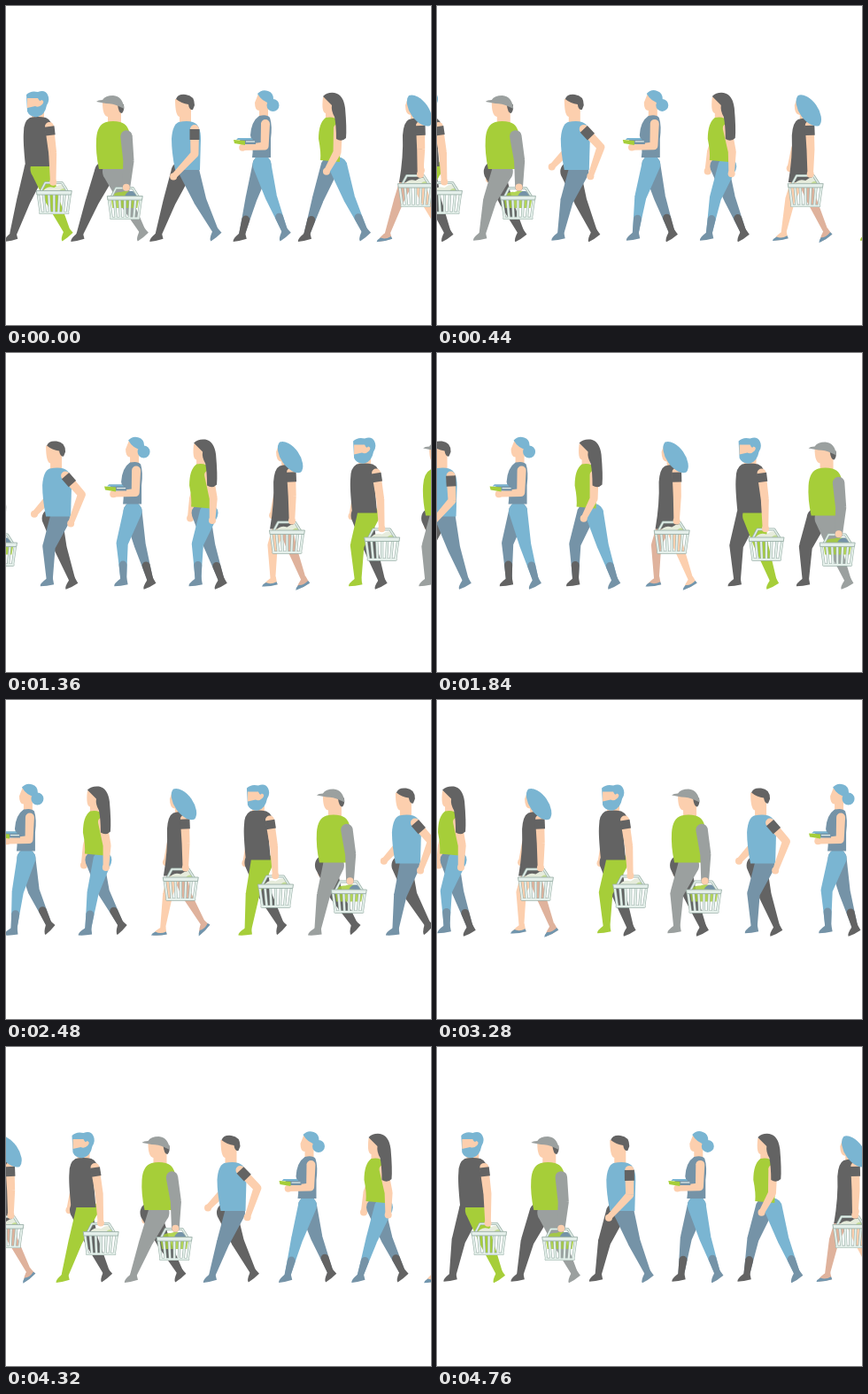
Write an HTML page that moves like this. It is 480 by 360 pixels and loops after 4800 ms.

```html
<!DOCTYPE html>
<html lang="en">
<head>
<meta charset="utf-8">
<title>Shopping queue</title>
<style>
html, body { margin: 0; width: 100%; height: 100%; overflow: hidden; background: #fff; }
svg { display: block; width: 480px; height: 360px; }
</style>
</head>
<body>
<svg id="stage" viewBox="0 0 480 360"></svg>
<script>
const LOOP = 4800, CYCLE = 960, SPAN = 515, STEP = 40, GROUND = 258.5;
const SKIN = '#fccfae', SHADE = '#dfb29c', DARK = '#636363', GREEN = '#a6ce39',
      BLUE = '#7ab5d2', SLATE = '#7593a7', GREY = '#9ba09f', SHOE = '#7196ae';
const stage = document.getElementById('stage');

// Ankle, foot and knee over one cycle, starting at heel contact
const STRIDE = [-25, -15.5, -6, 3.5, 13, 22, 28.5, 28, 23, 13, 0, -11.5];
const LIFT = [1, 0, 0, 0, 1, 2.5, 5, 6, 10, 11, 8, 3];
const PITCH = [8, 0, 0, 0, 8, 24, 35, 42, 45, 35, 20, 4];
const BEND = [1, 3, 3, 3, 2, 1.5, 2, 4, 9, 13, 12, 7];

// x is the place at time zero; near/far give hip offset and colours
const people = [
  { x: 36, hipY: 184, hipW: 25, stride: 1,
    near: [4, GREEN, GREEN], far: [-3, DARK, DARK],
    face: 'M-7 116H7V129H-7Z',
    body: [DARK, 'M-9 126Q0 124 9 126Q17 129 18 144L11 147L14 181H-14Q-17 152 -16 142Q-16 130 -9 126Z'],
    hair: [[BLUE, 'M-13 100Q-8 95 0 97Q8 94 11 100Q14 106 10 112Q8 123 0 125Q-9 126 -12 119Z'],
           [SKIN, 'M-12 104H0Q2 109 4 106Q8 107 5 111Q1 115 -3 113L-12 115Z']],
    arm: { at: [13, 136], up: [8, 1], lo: [2, 1], len: [30, 33], cuff: [0, 10], col: DARK },
    back: { lo: -4, col: SKIN }, basket: [19, 198, .7, 0] },
  { x: 121, hipY: 187, hipW: 24, stride: 1.15,
    near: [0, GREY, GREY], far: [-9, DARK, DARK],
    face: 'M-12 109H9V132H-6V125Q-12 124 -12 109Z',
    body: [GREEN, 'M-8 131Q0 129 8 131Q19 134 19 150L17 184H-16Q-20 165 -19 150Q-18 134 -8 131Z'],
    hair: [[DARK, 'M5 111H12Q13 118 10 121Q6 121 5 111Z'],
           [GREY, 'M-19 108Q-17 106 -12 106Q-9 101 0 101Q11 102 12.5 116L6 113Q0 110 -8 110Z']],
    arm: { at: [15, 147], up: [7, 2], lo: [-3, 2], len: [28, 30], col: GREY, full: 1, w: 1.35 },
    back: { lo: -2, col: DARK }, basket: [15.5, 204, 2.2, 1] },
  { x: 203, hipY: 187, hipW: 23, stride: 1.03,
    near: [4, SLATE, SLATE], far: [-5, DARK, DARK],
    face: 'M-12 105H6V132H-7V125Q-12 124 -12 105Z',
    body: [BLUE, 'M-8 131Q2 129 8 131Q17 134 17 150L16 185H-12Q-16 165 -16 150Q-15 134 -8 131Z'],
    hair: [[DARK, 'M-11 105Q-9 99 0 100Q10 101 10 112L8 117Q4 118 3 111Q-5 110 -11 105Z']],
    arm: { at: [10, 139], up: [22, 22], lo: [-31, 12], len: [28, 35], cuff: [0, 12], col: DARK },
    back: { lo: -34, col: SKIN } },
  { x: 293, hipY: 179, hipW: 21, stride: .9,
    near: [-4, BLUE, SLATE, 1], far: [-4, SLATE, DARK, 1],
    face: 'M-8 99H3V126H-7V118Q-12 118 -12 109Z',
    body: [SLATE, 'M-7 124Q2 122 5 126Q8 135 6 150V171H-15Q-13 158 -17 146Q-16 130 -7 124Z'],
    hair: [[BLUE, 'M-9 99Q-4 93.500 3 96Q9 98 9 105L6 110Q-4 108 -9 99Z'],
           [BLUE, 'M1.500 112a7 7 0 0 1 14 0a7 7 0 0 1 -14 0Z']],
    arm: { at: [0, 133], up: [-2, 0], lo: [-86, 0], len: [25, 25], col: SKIN },
    box: 1 },
  { x: 367, hipY: 181, hipW: 21, stride: 1.05,
    near: [8, BLUE, SLATE, 1], far: [-1, SLATE, DARK, 1],
    face: 'M-8 103H4V128H-6V121Q-11 120 -9 103Z',
    body: [GREEN, 'M-6 126Q4 124 9 130Q11 145 10 176L-12 174Q-11 165 -14 150Q-14 132 -6 126Z'],
    hair: [[DARK, 'M-9 102Q-4 97 4 98Q14 100 16 115Q18 138 17 149Q12 154 6 150Q6 135 4 125Q0 118 1 112Q-3 108 -9 102Z']],
    arm: { at: [8, 138], up: [5, 7], lo: [-15, 14], len: [27, 25], col: SKIN },
    back: { lo: 0, col: SKIN } },
  { x: 462, hipY: 184, hipW: 18, stride: 1.1, flats: 1,
    near: [-2, SKIN, SHOE], far: [-4, SHADE, SHOE],
    face: 'M-8 104H4V129H-5V123Q-11 123 -11 112Z',
    body: [DARK, 'M-7 128Q2 125 8 128Q11 135 10 147L7 165L9 199H-18Q-13 170 -14 146Q-13 131 -7 128Z'],
    hair: [[BLUE, 'M-7 101A12 21 -35 0 1 17 135A12 21 -35 0 1 -7 101Z']],
    arm: { at: [6, 135], up: [2, .5], lo: [-1, .5], len: [27, 28], cuff: [0, 11], col: DARK },
    back: { lo: -5, col: SKIN }, basket: [1, 190, .4, 0] }
];

function el(parent, tag, attrs) {
  const node = document.createElementNS('http://www.w3.org/2000/svg', tag);
  for (const k in attrs) node.setAttribute(k, attrs[k]);
  parent.appendChild(node);
  return node;
}
const set = (node, key, value) => node.setAttribute(key, value);
const mix = (a, b, k) => [a[0] + (b[0] - a[0]) * k, a[1] + (b[1] - a[1]) * k];
const polar = (p, deg, len) => [p[0] + Math.sin(deg * Math.PI / 180) * len,
                                p[1] + Math.cos(deg * Math.PI / 180) * len];

// Smooth periodic curve through evenly spaced keys
function curve(keys, phase) {
  const n = keys.length, f = phase * n, i = Math.floor(f), k = f - i;
  const at = j => keys[((i + j) % n + n) % n];
  const a = at(-1), b = at(0), c = at(1), d = at(2);
  return b + .5 * k * (c - a + k * (2 * a - 5 * b + 4 * c - d + k * (3 * (b - c) + d - a)));
}

// Tapered outline with round joints
function limb(pts, widths) {
  let d = '';
  const f = v => v.toFixed(2);
  pts.forEach((p, i) => {
    const r = widths[i] / 2, [x, y] = p;
    d += `M${f(x - r)} ${f(y)}a${r} ${r} 0 0 0 ${2 * r} 0a${r} ${r} 0 0 0 ${-2 * r} 0Z`;
    if (!i) return;
    const q = pts[i - 1], s = widths[i - 1] / 2, len = Math.hypot(x - q[0], y - q[1]) || 1;
    const nx = (q[1] - y) / len, ny = (x - q[0]) / len;
    d += `M${f(q[0] + nx * s)} ${f(q[1] + ny * s)}L${f(x + nx * r)} ${f(y + ny * r)}` +
         `L${f(x - nx * r)} ${f(y - ny * r)}L${f(q[0] - nx * s)} ${f(q[1] - ny * s)}Z`;
  });
  return d;
}

function makeBasket(parent, leafy) {
  const g = el(parent, 'g', {}), pale = '#e4efea', line = '#9cb2aa';
  if (leafy) {
    el(g, 'path', { d: 'M-16 12Q-12 5 -4 6Q4 3 10 7L16 13L14 24H-14Z', fill: GREEN, opacity: .85 });
    el(g, 'path', { d: 'M0 10Q3 4 9 5L15 11Z', fill: SLATE });
  } else {
    el(g, 'path', { d: 'M-14 13Q-9 4 0 7Q8 1 14 6L16 13Z', fill: '#e6ecdc' });
    el(g, 'path', { d: 'M5 12Q9 5 16 10V13Z', fill: '#c4dc96' });
  }
  for (const [col, w] of [[line, 3], [pale, 1.5]])
    el(g, 'path', { d: 'M-15 11L-10 1.5H9L15 11', fill: 'none', stroke: col, 'stroke-width': w, 'stroke-linejoin': 'round' });
  for (const [col, w] of [[line, 3.2], [pale, 2]]) {
    let d = 'M-15.5 35.5H15.5';
    for (let i = 0; i < 7; i++) d += `M${-18 + i * 6} 14L${-15 + i * 5} 35.5`;
    el(g, 'path', { d, fill: 'none', stroke: col, 'stroke-width': w, 'stroke-linecap': 'round' });
  }
  el(g, 'path', { d: 'M-20 10.5H20L19.3 15H-19.3Z', fill: pale, stroke: line, 'stroke-width': .9, 'stroke-linejoin': 'round' });
  return g;
}

function makeLeg(parent, [, col, shoe, boot], flats) {
  const leg = el(parent, 'path', { fill: col });
  const top = boot && el(parent, 'path', { fill: shoe });
  const foot = el(parent, 'g', {});
  el(foot, 'path', { fill: flats ? col : shoe, d: 'M3.500 -3L4.500 6Q-4 7.500 -11 7Q-11.500 4 -3.500 -1Z' });
  if (flats) el(foot, 'path', { fill: shoe, d: 'M4 3L5 6Q-4 8 -13 7Q-12 4.500 -8 3Q-3 6 4 3Z' });
  return { leg, boot: top, foot };
}

function makeArm(parent, col, cuff) {
  return {
    arm: el(parent, 'path', { fill: col }),
    hand: el(parent, 'circle', { r: 4, fill: SKIN }),
    cuff: cuff && el(parent, 'path', { stroke: cuff, 'stroke-width': 11 })
  };
}

function makeFigure(p, shift) {
  const root = el(stage, 'g', {}), a = p.arm, fig = { p, shift, root };
  if (p.back) fig.back = makeArm(root, p.back.col);
  fig.far = makeLeg(root, p.far, p.flats);
  fig.near = makeLeg(root, p.near, p.flats);
  const top = fig.top = el(root, 'g', {});
  el(top, 'path', { d: p.face, fill: SKIN });
  el(top, 'path', { d: p.body[1], fill: p.body[0] });
  if (p.basket) fig.basket = makeBasket(top, p.basket[3]);
  fig.arm = makeArm(top, a.full ? a.col : SKIN, a.cuff && a.col);
  if (p.box) {
    el(top, 'path', { d: 'M-31 149H-14L-11 151V156H-25Z', fill: SLATE });
    el(top, 'path', { d: 'M-31 149H-16L-14 151H-33Z', fill: BLUE });
    el(top, 'path', { d: 'M-36 151L-23 152V157L-35 155Z', fill: GREEN });
    el(top, 'path', { d: 'M-22 153H-12', stroke: '#e4efea', 'stroke-width': 1.2 });
  }
  for (const [fill, d] of p.hair) el(top, 'path', { d, fill });
  return fig;
}

function poseLeg(parts, p, hipX, phase, bob) {
  const hip = [hipX, p.hipY + bob];
  const ankle = [hipX + p.stride * curve(STRIDE, phase), GROUND - curve(LIFT, phase)];
  const dx = ankle[0] - hip[0], dy = ankle[1] - hip[1], dist = Math.hypot(dx, dy);
  const bend = curve(BEND, phase) / dist, mid = mix(hip, ankle, .48);
  const knee = [mid[0] - dy * bend, mid[1] + dx * bend];
  const w = p.hipW;
  set(parts.leg, 'd', limb([hip, knee, ankle], [w, w * .63, w * .31]));
  if (parts.boot) set(parts.boot, 'd', limb([mix(knee, ankle, .6), ankle], [9, 7]));
  set(parts.foot, 'transform', `translate(${ankle[0].toFixed(2)} ${ankle[1].toFixed(2)}) rotate(${-curve(PITCH, phase).toFixed(2)})`);
}

function poseArm(parts, at, up, lo, len, { cuff, w = 1 }) {
  const elbow = polar(at, up, len[0]), hand = polar(elbow, lo, len[1]);
  set(parts.arm, 'd', limb([at, elbow, hand], [10 * w, 9 * w, 6.5 * w]));
  set(parts.hand, 'cx', hand[0]);
  set(parts.hand, 'cy', hand[1]);
  if (cuff) set(parts.cuff, 'd', `M${polar(at, up, cuff[0])}L${polar(at, up, cuff[1])}`);
}

function pose(fig, t) {
  const p = fig.p, a = p.arm, phase = t % CYCLE / CYCLE;
  const swing = Math.cos(phase * 2 * Math.PI);
  const bob = -.9 * (1 - Math.cos(phase * 4 * Math.PI));
  const x = ((p.x - t / LOOP * SPAN + 60) % SPAN + SPAN) % SPAN - 60 + fig.shift;
  set(fig.root, 'transform', `translate(${x.toFixed(2)} 0)`);
  set(fig.top, 'transform', `translate(0 ${bob.toFixed(2)})`);
  poseLeg(fig.far, p, p.far[0], phase, bob);
  poseLeg(fig.near, p, p.near[0], (phase + .5) % 1, bob);
  poseArm(fig.arm, a.at, a.up[0] - a.up[1] * swing, a.lo[0] - a.lo[1] * swing, a.len, a);
  if (fig.back)
    poseArm(fig.back, [0, a.at[1] + bob], -6 + 16 * swing, p.back.lo + 10 * swing, [28, 23], {});
  if (fig.basket) {
    const [bx, by, sway] = p.basket;
    set(fig.basket, 'transform', `translate(${(bx - sway * swing).toFixed(2)} ${by})`);
  }
}

const figures = [];
for (const shift of [0, SPAN]) for (const p of people) figures.push(makeFigure(p, shift));

const start = performance.now();
function draw(now) {
  const t = Math.floor(Math.max(0, now - start) % LOOP / STEP) * STEP;
  for (const fig of figures) pose(fig, t);
  requestAnimationFrame(draw);
}
draw(start);
</script>
</body>
</html>
```
